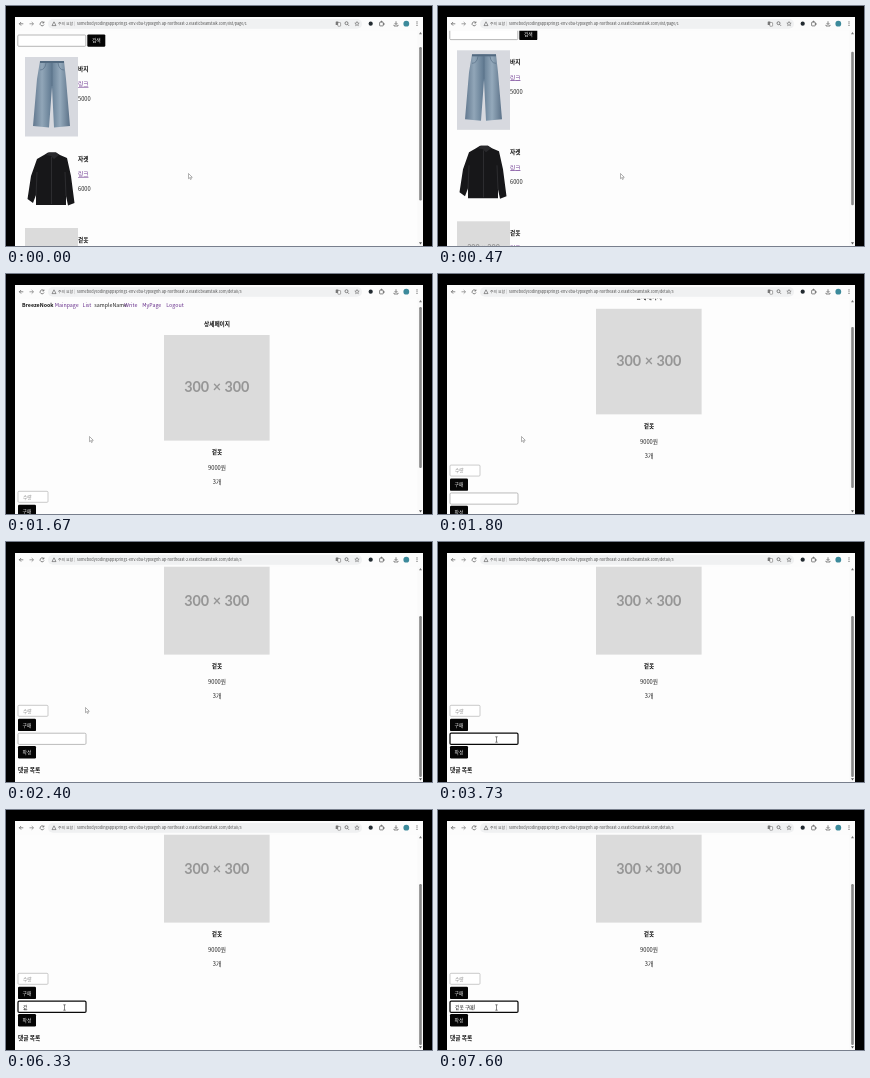
Write an HTML page with a canvas that moves like this. It is 426 px wide and 240 px high and loops after 8 s.

```html
<!DOCTYPE html>
<html lang="ko">
<head>
<meta charset="utf-8">
<style>
html, body { margin: 0; width: 100%; height: 100%; overflow: hidden; background: #000; }
canvas { display: block; width: 426px; height: 240px; }
</style>
</head>
<body>
<canvas id="stage"></canvas>
<script>
const W = 426, H = 240, LOOP = 8000, STEP = 1000 / 15;
const canvas = document.getElementById('stage');
const ctx = canvas.getContext('2d');
const scale = window.devicePixelRatio || 1;
canvas.width = W * scale;
canvas.height = H * scale;

const SANS = '"Noto Sans CJK KR", "Noto Sans CJK", "Noto Sans", sans-serif';
const INK = '#222', PURPLE = '#68308c', PAGE = '#fdfdfd';
const HOST = 'somebodycodingappspring1-env.eba-typxegnh.ap-northeast-2.elasticbeanstalk.com';
const OPEN_DETAIL = 1460, FOCUS = 2930;

const NAV = [
  ['BreezeNook', 16, '#111', 700], ['Mainpage', 48.7, PURPLE], ['List', 76.5, PURPLE],
  ['sampleName', 88.3, INK], ['Write', 118.3, PURPLE], ['MyPage', 136.3, PURPLE], ['Logout', 160.3, PURPLE]
];

// Comment field contents over time, jamo by jamo
const TYPING = [
  [3800, 'ㄱ'], [4000, '거'], [4130, '걷'], [4530, '것'], [4670, '거'], [4800, 'ㄱ'], [4930, ''],
  [5070, 'ㄱ'], [5200, '거'], [5470, '걷'], [5600, '거'], [5800, ''],
  [6070, 'ㄱ'], [6130, '거'], [6330, '겉'], [6530, '겉ㅇ'], [6600, '겉오'], [6870, '겉옷'], [6930, '겉옷 '],
  [7070, '겉옷 ㄱ'], [7200, '겉옷 구'], [7330, '겉옷 굼'], [7470, '겉옷 구매'], [7600, '겉옷 구매']
];

const clamp = v => Math.max(0, Math.min(1, v));
const mix = (a, b, p) => a + (b - a) * p;
function ease(t, from, to) {
  const p = clamp((t - from) / (to - from));
  return p * p * (3 - 2 * p);
}

function text(str, x, y, { size = 5.7, color = INK, weight = 400, align = 'left', font = SANS } = {}) {
  ctx.font = `${weight} ${size}px ${font}`;
  ctx.fillStyle = color;
  ctx.textAlign = align;
  ctx.textBaseline = 'middle';
  ctx.fillText(str, x, y);
  return ctx.measureText(str).width;
}

function rect(x, y, w, h, color) {
  ctx.fillStyle = color;
  ctx.fillRect(x, y, w, h);
}

function round(x, y, w, h, r, fill, stroke, line = 0.7) {
  ctx.beginPath();
  ctx.roundRect(x, y, w, h, r);
  if (fill) { ctx.fillStyle = fill; ctx.fill(); }
  if (stroke) { ctx.strokeStyle = stroke; ctx.lineWidth = line; ctx.stroke(); }
}

function poly(points, fill, stroke, line = 0.6) {
  ctx.beginPath();
  for (let i = 0; i < points.length; i += 2) ctx.lineTo(points[i], points[i + 1]);
  ctx.closePath();
  if (fill) { ctx.fillStyle = fill; ctx.fill(); }
  if (stroke) { ctx.strokeStyle = stroke; ctx.lineWidth = line; ctx.stroke(); }
}

function path(d, color, line = 0.7) {
  ctx.strokeStyle = color;
  ctx.lineWidth = line;
  ctx.stroke(new Path2D(d));
}

function dot(x, y, r, color) {
  ctx.fillStyle = color;
  ctx.beginPath();
  ctx.arc(x, y, r, 0, Math.PI * 2);
  ctx.fill();
}

function link(str, x, y, color = PURPLE, size) {
  const w = text(str, x, y, { color, size });
  rect(x, y + 2.8, w, 0.5, color);
}

function button(label, x, y) {
  round(x, y, 18, 12.4, 1.2, '#050505');
  text(label, x + 9, y + 6.2, { size: 4.8, color: '#eee', align: 'center' });
}

function placeholder(x, y, size) {
  rect(x, y, size, size, '#dbdbdb');
  text('300 × 300', x + size / 2, y + size / 2, {
    size: size * 0.136, weight: 700, color: '#969696', align: 'center', font: 'Lato, sans-serif'
  });
}

function jeans() {
  rect(19, 51, 53, 79.5, '#d7d9df');
  const denim = ctx.createLinearGradient(27, 0, 63, 0);
  [['0', '#62788f'], ['.25', '#91a6b8'], ['.5', '#647d94'], ['.75', '#94a9bb'], ['1', '#61778d']]
    .forEach(([at, color]) => denim.addColorStop(+at, color));
  poly([34, 55, 58, 55, 60, 73, 64, 120, 48, 121.5, 46, 81, 43, 121.5, 27, 120, 31, 73], denim);
  rect(34, 55, 24, 2, '#536a80');
  path('M46 57V80M34 64Q39 64 40 57M58 64Q53 64 52 57', '#526a81', 0.6);
}

function jacket() {
  poly([38, 149, 42, 146.5, 50, 146.5, 54, 149, 61, 152, 65, 170, 68.5, 197, 62, 199.5, 60, 190,
    60, 199, 30, 199, 30, 189, 27, 197, 21.5, 193, 25, 170, 31, 153], '#171719');
  poly([40, 149, 43, 146.5, 50, 146.5, 53, 149, 48, 153, 45, 150], '#29292c');
  path('M45.5 151V198M31 166L30 190M59 166L60 190', '#3b3b3f', 0.6);
}

function listPage() {
  round(11.8, 29, 68, 11.3, 1, '#fff', '#999');
  button('검색', 81.3, 28.4);
  jeans();
  jacket();
  placeholder(19, 222, 53);
  [['바지', 63, 5000], ['자켓', 153, 6000], ['겉옷', 233.5, 9000]].forEach(([name, y, price]) => {
    text(name, 72, y, { weight: 700, color: '#111' });
    link('링크', 72, y + 15.2);
    text(price, 72, y + 29.6);
  });
  text('1', 12, 289.5, { weight: 700 });
  for (let n = 2; n <= 9; n++) link(n, 16.4 + (n - 2) * 4.35, 289.5);
  link('다음', 52.5, 289.5, '#1746d0', 4.4);
}

function fieldText(t) {
  let value = '';
  for (const [at, str] of TYPING) if (t >= at - 7) value = str;
  return value;
}

function commentField(t) {
  const focus = ease(t, FOCUS, 3200);
  const shade = Math.round(mix(160, 10, focus));
  round(12, 245.2, 68, 11.2, 1.2, '#fff', `rgb(${shade},${shade},${shade})`, mix(0.7, 1.25, focus));
  const value = fieldText(t);
  const w = text(value, 17, 251, { size: 4.8 });
  const caretOn = value ? value.length > 1 : t >= FOCUS && t < 3720;
  if (caretOn) rect(17.3 + w, 248.6, 0.5, 4.8, '#333');
  if (value && !value.endsWith(' ')) {
    const last = ctx.measureText(value.slice(-1)).width;
    rect(17 + w - last, 253.4, last, 0.4, '#555');
  }
}

function detailPage(t) {
  const center = { align: 'center' }, bold = { align: 'center', weight: 700, color: '#111' };
  NAV.forEach(([label, x, color, weight]) => text(label, x, 30.5, { size: 5.3, color, weight }));
  text('상세페이지', 211, 49.5, bold);
  placeholder(158, 61, 105.6);
  text('겉옷', 211, 178.3, bold);
  text('9000원', 211, 194.2, center);
  text('3개', 211, 208, center);
  round(12, 217.3, 30, 11, 1, '#fff', '#b5b5b5');
  text('수량', 17, 222.8, { size: 4.7, color: '#888' });
  button('구매', 12, 230.7);
  commentField(t);
  button('작성', 12, 258);
  text('댓글 목록', 12, 282.3, { weight: 700, color: '#111' });
}

function toolbar(route, loading) {
  const icon = '#555';
  rect(9, 11, 408, 13.5, '#fcfcfc');
  round(42, 13, 314, 9.8, 4.9, '#f0f1f2');
  path('M17.3 17.8H13.4M15.1 16L13.3 17.8L15.1 19.6', icon);
  path('M23.5 17.8H27.4M25.7 16L27.5 17.8L25.7 19.6', '#777');
  if (loading) path('M34.5 16.2L37.7 19.4M37.7 16.2L34.5 19.4', icon);
  else path('M37.6 16.5A2 2 0 1 0 38 18.5M37.9 15.5V17H36.4', icon);
  poly([48, 15.8, 50, 19.6, 46, 19.6], null, icon);
  text('주의 요함', 52, 17.8, { size: 3.9, color: '#555' });
  rect(68.5, 15.5, 0.4, 4.6, '#bbb');
  text(HOST + route, 71, 17.8, { size: 3.8, color: '#4a4a4a' });
  round(329.7, 15.5, 2.8, 3.6, 0.4, '#777');
  round(331.8, 16.6, 2.8, 3.6, 0.4, '#fff', icon, 0.5);
  path('M342 17.2A1.5 1.5 0 1 0 339 17.2A1.5 1.5 0 1 0 342 17.2M341.6 18.4L343 19.8', icon);
  const star = [];
  for (let i = 0; i < 10; i++) {
    const a = i * Math.PI / 5 - Math.PI / 2, r = i % 2 ? 1 : 2.3;
    star.push(351 + r * Math.cos(a), 17.8 + r * Math.sin(a));
  }
  poly(star, null, icon, 0.5);
  dot(364.7, 17.7, 2.1, '#222a30');
  round(373.6, 16.2, 3.7, 3.7, 0.5, null, icon);
  path('M375 16V15.2H376V16M377.4 17.5H378.2V18.5H377.4', icon);
  path('M390 15.3V18.4M388.6 17.1L390 18.5L391.4 17.1M388 18.8V20H392V18.8', icon);
  dot(400.3, 17.7, 2.9, '#3c8a9b');
  [15.9, 17.7, 19.5].forEach(y => dot(411, y, 0.55, icon));
}

function scrollbar(top, height) {
  rect(411.5, 24.5, 5.5, 215.5, '#fafafa');
  poly([414.5, 26, 416, 28.2, 413, 28.2], '#777');
  poly([414.5, 238.4, 416, 236.2, 413, 236.2], '#555');
  round(413.2, top, 2.6, height, 1.2, '#878787');
}

function pointer(t) {
  const stops = [
    [650, 182.5, 167.5], [1270, 77, 190.5], [1400, 77, 190.5], [1670, 83.5, 162.5],
    [2330, 83.5, 162.5], [2400, 79.5, 165.5], [2730, 58.5, 191.5], [2860, 58.5, 191.5], [3060, 58.5, 197.5]
  ];
  let [, x, y] = stops[0];
  for (let i = 1; i < stops.length; i++) {
    const [from, ax, ay] = stops[i - 1], [to, bx, by] = stops[i];
    if (t >= from) {
      const p = ease(t, from, to);
      x = mix(ax, bx, p);
      y = mix(ay, by, p);
    }
  }
  ctx.save();
  ctx.translate(x, y);
  if (t > 2700) {
    path('M-1.2 -2.7H1.2M0 -2.7V2.7M-1.2 2.7H1.2', '#333', 0.6);
  } else if (t > 1180 && t < OPEN_DETAIL) {
    const hand = new Path2D('M0 0Q.7 -.8 1.3 0V2L4 2.8V4.8L3 6.4H.2L-1.6 3.6L-.8 3L0 3.7Z');
    ctx.fillStyle = '#fff';
    ctx.fill(hand);
    ctx.strokeStyle = '#555';
    ctx.lineWidth = 0.5;
    ctx.stroke(hand);
  } else {
    poly([0, 0, 0, 5.2, 1.2, 4.2, 2, 6, 2.9, 5.6, 2.1, 3.8, 3.8, 3.8], '#fff', '#666', 0.5);
  }
  ctx.restore();
}

function draw(t) {
  const detail = t >= OPEN_DETAIL;
  const progress = detail ? ease(t, 1670, 1935) : ease(t, 340, 930);
  const scroll = progress * (detail ? 54 : 56.4);
  ctx.setTransform(scale, 0, 0, scale, 0, 0);
  rect(0, 0, W, H, '#000');
  rect(9, 11, 408, 229, PAGE);
  ctx.save();
  ctx.beginPath();
  ctx.rect(9, 24.5, 408, 215.5);
  ctx.clip();
  ctx.translate(0, -scroll);
  if (detail) detailPage(t); else listPage();
  ctx.restore();
  if (detail) scrollbar(mix(33, 74, progress), 161);
  else scrollbar(mix(41, 81.5, progress), 153.5);
  toolbar(detail ? '/detail/3' : '/list/page/1', t > 1260 && t < 1600);
  pointer(t);
}

const start = performance.now();
function tick() {
  const t = (performance.now() - start) % LOOP;
  draw(Math.floor((t + 7) / STEP) * STEP);
  requestAnimationFrame(tick);
}
tick();
</script>
</body>
</html>
```
